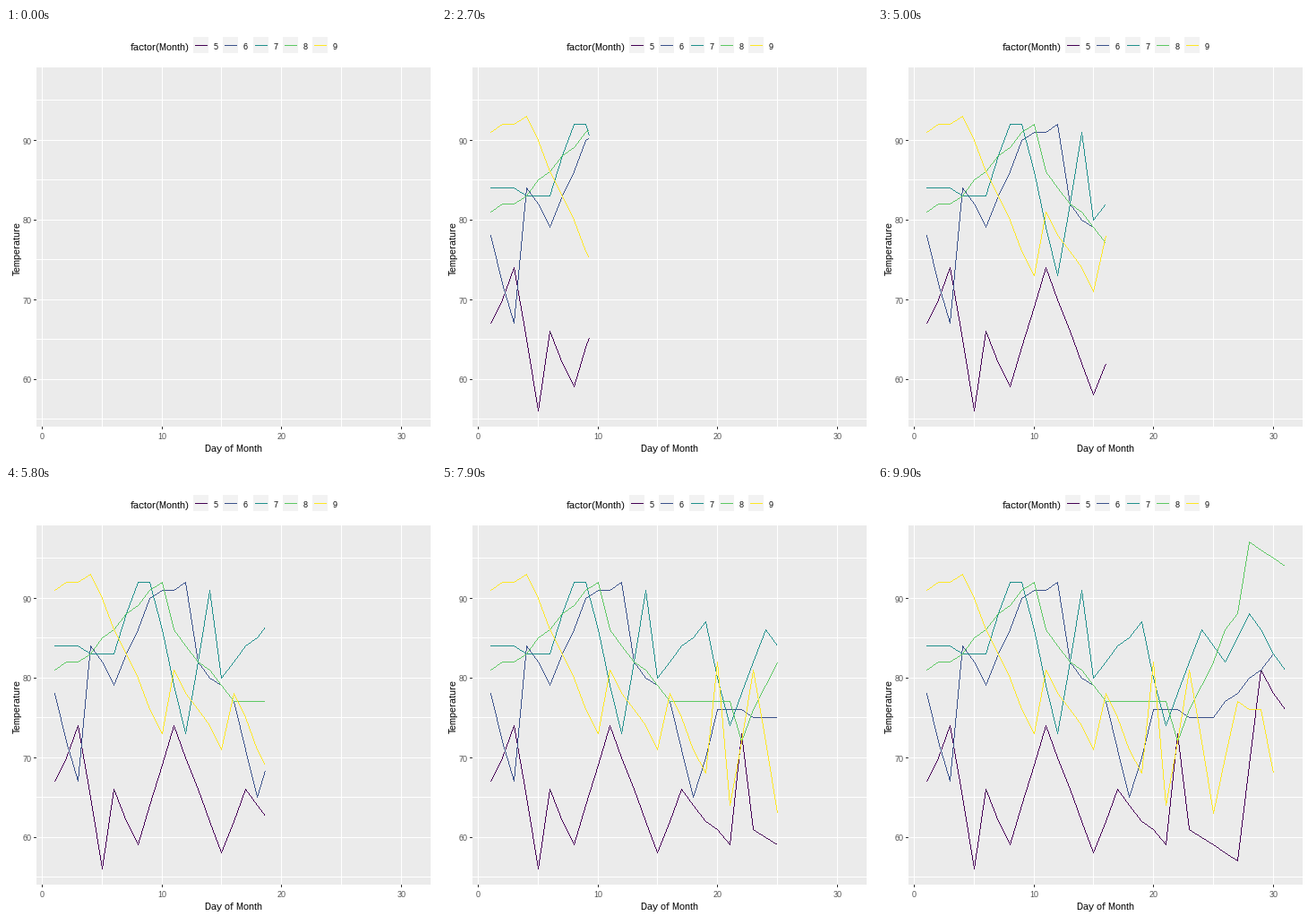
A matplotlib script that plays this animation: 480 px wide and 480 px high, repeating every 10 s.

```python
import numpy as np
import matplotlib as mpl
import matplotlib.pyplot as plt
from matplotlib.animation import FuncAnimation
from matplotlib.colors import to_rgba
from matplotlib.patches import Rectangle

SIZE, DPI, FRAMES = 480, 100, 100
PX = 72 / DPI  # one pixel in points
mpl.rcParams.update({
    "font.family": "Liberation Sans",
    "text.hinting": "native",
    "text.hinting_factor": 1,
})

# Main turning points (day, temperature) of each month's curve
TURNS = {
    5: [(1, 67), (3, 74), (5, 56), (6, 66), (8, 59), (11, 74), (15, 58),
        (17, 66), (21, 59), (22, 73), (23, 61), (27, 57), (29, 81), (31, 76)],
    6: [(1, 78), (3, 67), (4, 84), (6, 79), (9, 90), (12, 92), (13, 82),
        (16, 77), (18, 65), (20, 76), (25, 75), (30, 83)],
    7: [(1, 84), (6, 83), (8, 92), (9, 92), (12, 73), (14, 91), (15, 80),
        (19, 87), (21, 74), (24, 86), (26, 82), (28, 88), (31, 81)],
    8: [(1, 81), (3, 82), (10, 92), (11, 86), (16, 77), (21, 77), (22, 72),
        (26, 86), (27, 88), (28, 97), (31, 94)],
    9: [(1, 91), (4, 93), (10, 73), (11, 81), (15, 71), (16, 78), (19, 68),
        (20, 82), (21, 64), (23, 81), (25, 63), (27, 77), (29, 76), (30, 68)],
}
COLORS = ["#440154", "#3B528B", "#21908C", "#5DC863", "#FDE725"]


def col(day):
    return np.floor(54.2 + 13.34 * (np.asarray(day) - 1)).astype(int)


def row(temp):
    return np.floor(98.35 + 8.9 * (93 - np.asarray(temp))).astype(int)


def daily(turns):
    """Whole-degree value for every day between the turning points."""
    days = np.arange(1, turns[-1][0] + 1)
    return days, np.round(np.interp(days, *zip(*turns)))


fig = plt.figure(figsize=(SIZE / DPI, SIZE / DPI), dpi=DPI, facecolor="white")
ax = fig.add_axes([0, 0, 1, 1])


def box(x, y, w, h, color):
    ax.add_patch(Rectangle((x, y), w, h, fc=color, ec="none", lw=0,
                           antialiased=False))


def label(x, y, text, size, color="black", ha="center", **kw):
    ax.text(x, y, text, fontsize=size * PX, color=color, ha=ha,
            va="baseline", **kw)


# Panel, grid and axes
box(34, 44, 440, 401, "#EBEBEB")
for day in range(0, 31, 5):
    box(col(day), 44, 1, 401, "white")
for temp in range(55, 96, 5):
    box(34, row(temp), 440, 1, "white")
for day in range(0, 31, 10):
    box(col(day), 445, 1, 3, "#333333")
    label(col(day) + 0.5, 459, str(day), 9, "#4D4D4D")
for temp in range(60, 91, 10):
    box(31, row(temp), 3, 1, "#333333")
    label(29, row(temp) + 4.5, str(temp), 9, "#4D4D4D", ha="right")
label(254, 473, "Day of Month", 11)
label(16, 245.5, "Temperature", 11, rotation=90, rotation_mode="anchor")

# Legend
label(139, 25, "factor(Month)", 11, ha="left")
for i, (month, color) in enumerate(zip(TURNS, COLORS)):
    x = round(209 + 33.3 * i)
    box(x, 10, 17, 18, "#F2F2F2")
    box(x + 2, 19, 14, 1, color)
    label(x + 23, 24, str(month), 9, ha="left")

# Curves are one-pixel lines without smoothing, set on a clear layer
layer = ax.imshow(np.zeros((SIZE, SIZE, 4)), extent=(0, SIZE, SIZE, 0),
                  interpolation="nearest", aspect="auto", zorder=3)
ax.set(xlim=(0, SIZE), ylim=(SIZE, 0))
ax.axis("off")


def trace(canvas, xs, ys, color):
    for x0, y0, x1, y1 in zip(xs, ys, xs[1:], ys[1:]):
        n = max(abs(x1 - x0), abs(y1 - y0))
        t = np.arange(n) / max(n, 1)
        px = np.floor(x0 + (x1 - x0) * t + 0.5).astype(int)
        py = np.floor(y0 + (y1 - y0) * t + 0.5).astype(int)
        canvas[py, px] = color


curves = [(*daily(turns), to_rgba(c))
          for turns, c in zip(TURNS.values(), COLORS)]

# Each day is reached on a whole step; the lines grow evenly in between
all_days = np.arange(1, 32)
steps = np.round((FRAMES - 1) * (all_days - 1) / 30)


def draw(frame):
    now = np.interp(frame, steps, all_days)
    canvas = np.zeros((SIZE, SIZE, 4))
    for days, temps, color in curves:
        end = min(now, days[-1])
        xs = np.append(days[days < end], end)
        trace(canvas, col(xs), row(np.interp(xs, days, temps)), color)
    layer.set_data(canvas)
    return [layer]


anim = FuncAnimation(fig, draw, frames=FRAMES, interval=100, repeat=True,
                     repeat_delay=0, blit=False)
plt.show()
```
